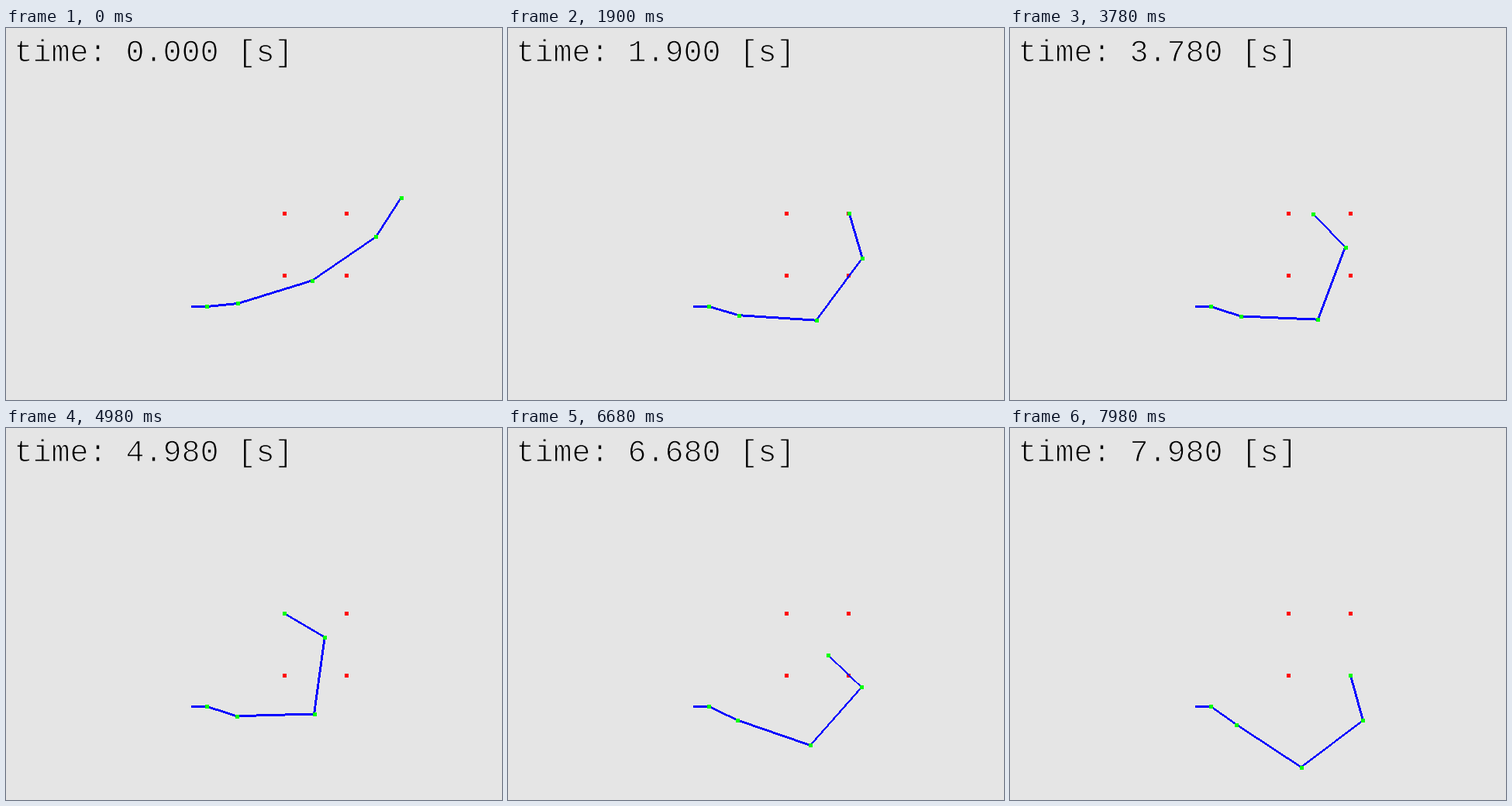
Recreate the animation shown at these times as a matplotlib script. Size 640 by 480 pixels, loop 8 s.

```python
import numpy as np
import matplotlib.pyplot as plt
from matplotlib.animation import FuncAnimation
from matplotlib.collections import PolyCollection
from matplotlib.patheffects import Stroke

W, H, DPI = 640, 480, 100
FRAMES, STEP = 400, 20
PX = 72 / DPI
BG = "#e5e5e5"

BASE = np.array([260.0, 360.0])
LINKS = np.array([40, 100, 100, 60])
START = np.array([0.1, 0.2, 0.3, 0.4])
TARGETS = [(x, y) for x in (360, 440) for y in (240, 320)]
# via point, time of the middle of the move, steepness
MOVES = [((440, 240), 1.22, 6.5), ((360, 240), 3.73, 9.0), ((440, 320), 6.58, 7.0)]
DAMPING = 21000  # joint friction for unit masses at the joints


def joints(q):
    a = np.cumsum(q)
    steps = LINKS[:, None] * np.column_stack([np.cos(a), -np.sin(a)])
    return np.vstack([BASE, BASE + np.cumsum(steps, axis=0)])


def jacobians(p):
    """Velocity of every joint k per turn of every joint i <= k."""
    r = p[1:, None] - p[None, :-1]
    jac = np.stack([r[..., 1], -r[..., 0]], axis=1)
    return jac * np.tri(len(LINKS))[:, None, :]


def goal(t):
    here = prev = joints(START)[-1]
    for via, mid, k in MOVES:
        via = np.array(via, float)
        here = here + (via - prev) / (1 + np.exp(-k * (t - mid)))
        prev = via
    return here


def solve():
    """Arm with inertia and friction whose tip is led along the path."""
    h = STEP / 1000
    q, vel, poses = START.copy(), np.zeros((len(LINKS), 2)), []
    for i in range(FRAMES):
        p = joints(q)
        poses.append(p)
        jac = jacobians(p)
        tip = jac[-1]
        inv = np.linalg.inv(np.einsum("kci,kcj->ij", jac, jac) + DAMPING * h * np.eye(len(LINKS)))
        free = inv @ np.einsum("kci,kc->i", jac, vel)
        want = (goal((i + 1) * h) - p[-1]) / h
        pull = np.linalg.solve(tip @ inv @ tip.T, want - tip @ free)
        turn = free + inv @ tip.T @ pull
        q = q + h * turn
        vel = jacobians(joints(q)) @ turn
    return poses


def square(p):
    x, y = np.floor(np.asarray(p) - 0.02) - 2
    return [(x, y), (x + 5, y), (x + 5, y + 5), (x, y + 5)]


def bar(a, b):
    """Hard-edged line, three pixels thick along its minor axis."""
    a, b = a - 0.5, b - 0.5
    dx, dy = np.abs(b - a)
    half = (2 - min(dx, dy) / max(dx, dy)) / 2
    off = np.array([0, half]) if dx >= dy else np.array([half, 0])
    return [a - off, b - off, b + off, a + off]


fig = plt.figure(figsize=(W / DPI, H / DPI), dpi=DPI, facecolor=BG)
ax = fig.add_axes([0, 0, 1, 1])
ax.set(xlim=(0, W), ylim=(H, 0))
ax.axis("off")


def shapes(color, polys=(), **kw):
    c = PolyCollection(list(polys), facecolors=color, linewidths=0, antialiaseds=False, **kw)
    return ax.add_collection(c, autolim=False)


shapes("#ff0000", [square(p) for p in TARGETS])
arm = shapes("#0000ff", snap=False)
dots = shapes("#00ff00")
# a background-coloured outline thins the letters
label = ax.text(10.5, 43, "", family="Liberation Mono", size=40 * PX, va="baseline",
                path_effects=[Stroke(linewidth=1.1 * PX, foreground=BG)])

POSES = solve()


def draw(i):
    p = POSES[i]
    chain = np.vstack([BASE - [20, 0], p])
    arm.set_verts([bar(a, b) for a, b in zip(chain, chain[1:])])
    dots.set_verts([square(j) for j in p])
    label.set_text(f"time: {i * STEP / 1000:.3f} [s]")
    return arm, dots, label


anim = FuncAnimation(fig, draw, frames=FRAMES, interval=STEP, repeat=True, repeat_delay=0)
plt.show()
```
